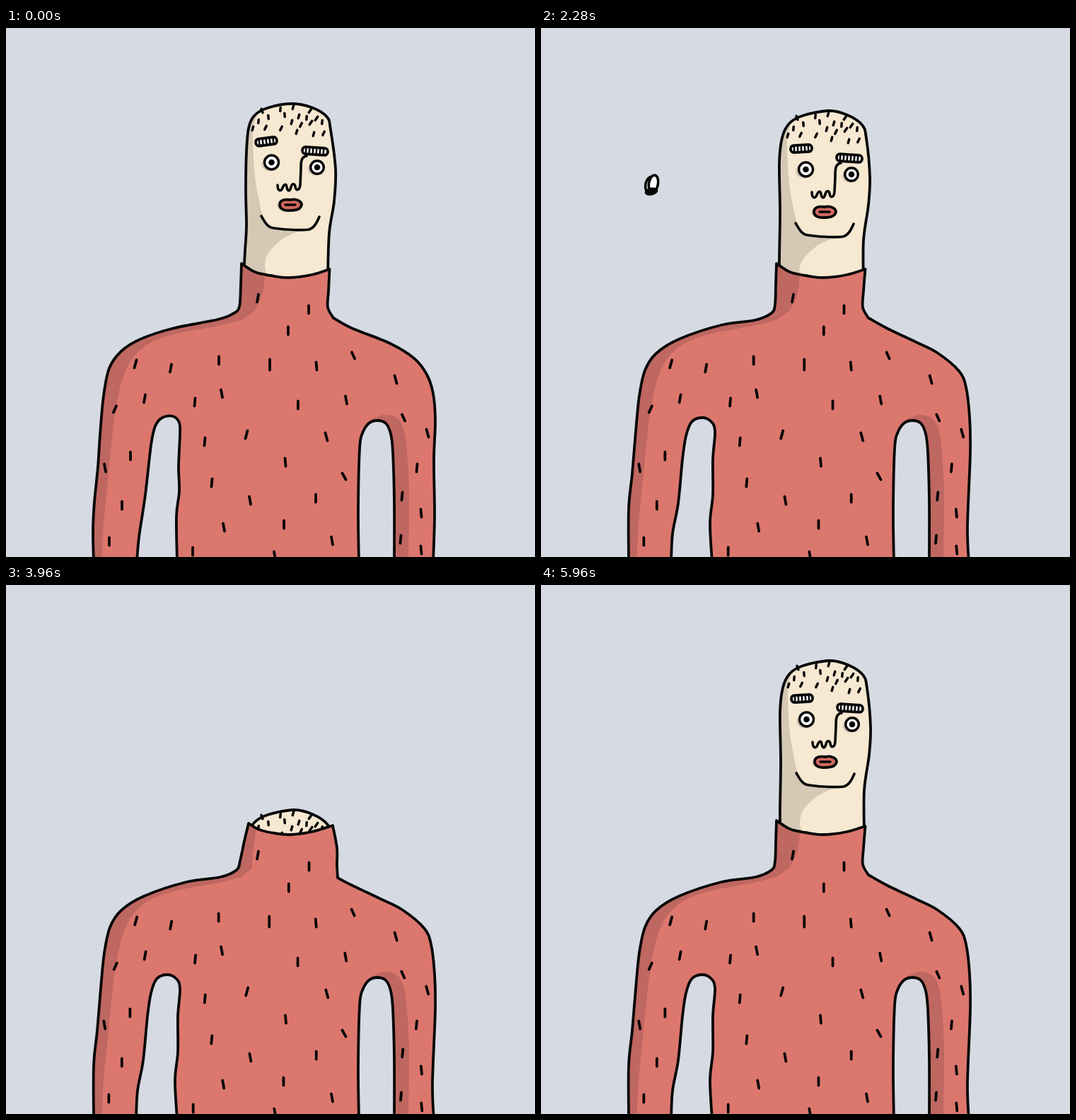
Recreate the animation shown at these times as an HTML page. Size 748 px wide and 748 px high, loop 6000 ms.

```html
<!DOCTYPE html>
<html lang="en">
<head>
<meta charset="utf-8">
<title>Turtleneck</title>
<style>
  html, body { margin: 0; width: 100%; height: 100%; overflow: hidden; background: #d6dae3; }
  svg { display: block; width: 100vw; height: 100vh; }
  .ink { stroke: #060606; stroke-width: 3.8; stroke-linecap: round; stroke-linejoin: round; fill: none; }
  .shade { fill: #1c1018; opacity: .15; }
</style>
</head>
<body>
<svg id="stage" viewBox="0 0 748 748">
  <defs>
    <clipPath id="inBody"><path id="bodyClip"/></clipPath>
    <clipPath id="inHead"><path id="headClip"/></clipPath>
    <clipPath id="aboveCollar"><rect width="748" height="352"/></clipPath>
  </defs>
  <g clip-path="url(#aboveCollar)"><g id="head"></g></g>
  <g id="body"></g>
  <g id="fly"></g>
</svg>
<script>
const el = id => document.getElementById(id);
const FPS = 6, DRAWINGS = 36, TICK = 40, LOOP = 6000;

const points = s => s.trim().split(/\s+/).map(p => p.split(',').map(Number));

// Catmull-Rom curve through points, without the initial move
function curve(pts) {
  let d = `L${pts[0]}`;
  for (let i = 0; i < pts.length - 1; i++) {
    const a = pts[i - 1] || pts[i], b = pts[i], c = pts[i + 1], e = pts[i + 2] || c;
    const c1 = b.map((v, j) => (v + (c[j] - a[j]) / 6).toFixed(1));
    const c2 = c.map((v, j) => (v - (e[j] - b[j]) / 6).toFixed(1));
    d += `C${c1} ${c2} ${c}`;
  }
  return d;
}
const join = (...parts) => 'M' + parts.map(curve).join('').slice(1);

const HEAD = [
  '336,350 338,315 340,280 339,230 340,175 343,142 351,124 370,113 404,107 434,113 454,126 459,144 466,200 464,245 457,290 455,352',
  '338,350 338,315 339,250 338,180 342,145 352,125 371,114 408,107 434,113 455,127 461,146 466,200 464,240 457,290 457,352'
].map(points);
const HEAD_SHADE = join(points('320,120 353,120 349,145 351,200 357,240 364,268 376,282'),
  points('414,287 390,299 371,318 366,335 365,355 320,355')) + 'Z';

const LEFT = [
  '330,394 321,404 300,412 235,425 190,440 163,457 146,481 138,520 133,575 130,620 125,670 123,710 124,756',
  '331,390 326,403 303,413 255,420 195,440 163,460 147,484 139,520 134,570 129,630 124,680 124,756'
].map(points);
const GAP_LEFT = [
  '185,756 188,720 197,660 205,590 211,563 221,551 236,549 245,558 246,574 244,620 245,655 241,690 242,756',
  '184,756 186,715 194,672 200,610 205,577 213,557 227,551 240,556 246,570 243,610 243,660 239,700 242,756'
].map(points);
const GAP_RIGHT = points('499,756 498,680 500,595 504,573 513,559 525,555 537,559 544,574 547,600 549,670 549,756');
const RIGHT = [
  '604,756 606,690 605,610 607,555 604,517 595,490 577,467 543,446 488,424',
  '605,756 603,705 607,600 606,550 601,508 591,485 560,459 530,444 488,424'
].map(points);

const HAIR = points(`362,117 388,115 406,112 430,117 371,126 357,132 349,142 367,141 394,123 414,125
  404,133 389,142 425,127 411,147 417,137 431,134 447,133 435,150 449,149 439,128`);

// x, y and lean of every dash on the sweater
const DASHES = points(`356,382,2 428,398,0 399,428,0 183,475,3 233,481,2 301,470,0 373,476,0 439,478,-1
  491,463,-4 551,497,-3 196,524,2 154,539,4 267,529,1 305,517,-2 413,533,0 481,526,-2 562,551,-4 596,573,-3
  281,585,1 340,575,3 453,578,-3 395,614,-1 478,634,-5 581,622,1 140,622,-2 176,605,0 291,643,1 345,668,-2
  438,665,0 560,662,1 587,686,-1 164,675,0 146,726,0 308,706,-2 393,702,0 461,725,-2 558,723,1 587,738,-1
  264,740,0 380,746,-2`);

const FLIGHT = points('738,205 680,245 508,289 440,312 370,318 300,300 228,262 156,221 12,190');
const FLIGHT_START = 6, DUCK_START = 12, RISE_START = 26, LOW = 211;
const DUCK = [0, 10, 28, 52, 80, 108, 136, 162, 189, 204, LOW];
const RISE = [LOW, 203, 178, 145, 109, 74, 45, 25, 10, 0];

function headDrop(k) {
  if (k < DUCK_START) return 0;
  if (k >= RISE_START) return RISE[k - RISE_START];
  return DUCK[Math.min(k - DUCK_START, DUCK.length - 1)];
}

const path = (d, attrs = 'class="ink"') => `<path d="${d}" ${attrs}/>`;
const oval = (x, y, rx, ry, attrs) => `<ellipse cx="${x}" cy="${y}" rx="${rx}" ry="${ry}" ${attrs}/>`;
const inked = (fill, width = 3.8) => `class="ink" style="fill:${fill};stroke-width:${width}"`;

function brow(x, y, w, tilt) {
  let bars = '';
  for (let i = -w / 2 + 5; i < w / 2 - 2; i += 5) bars += `M${i} -4L${i} 4`;
  return `<g transform="translate(${x} ${y}) rotate(${tilt})">
    <rect x="${-w / 2}" y="-5" width="${w}" height="10" rx="4.5" ${inked('#fff')}/>
    ${path(bars, inked('none', 2.6))}</g>`;
}

function eye(x, y, r, gaze) {
  return oval(x - 3, y + 2.5, r + 1, r, 'class="shade"') + oval(x, y, r, r, inked('#fff', 3.4)) +
    oval(x + gaze[0], y + gaze[1], 4.3, 4.3, 'fill="#060606"');
}

function drawHead(odd, drop, gaze) {
  const outline = join(HEAD[odd]);
  el('headClip').setAttribute('d', outline);
  const hair = HAIR.map(([x, y], i) => {
    const lean = i === 0 ? -2 : i % 4 - 0.5 + (x > 410 ? 1 : 0);
    return `M${x + odd + lean / 2} ${y - 2.6}L${x + odd - lean / 2} ${y + 2.6}`;
  }).join('');
  const nose = 'M425 181C417 182 417 190 417 200L416 222C415 230 410 231 409 224C408 219 404 220 403 225' +
    'C401 232 398 231 397 225C396 219 393 221 391 226C389 232 384 231 384 222';
  const lips = 'M387 250C387 243 394 242 402 243C411 241 418 245 418 250C417 256 410 258 402 258C394 259 387 256 387 250Z';
  const jaw = 'M361 266C366 274 369 282 379 283C400 286 420 286 428 285C436 283 440 274 443 267';
  el('head').setAttribute('transform', `translate(${-odd * Math.min(drop, 10) / 10} ${drop})`);
  el('head').innerHTML = path(outline, 'fill="#f6e8d1"') +
    (drop < 150 ? `<g clip-path="url(#inHead)">${path(HEAD_SHADE, 'class="shade"')}</g>` : '') +
    path(outline) + path(hair, inked('none', 3.5)) +
    brow(368 + odd, 160.5, 30, odd ? -3 : -7) + brow(437, 174, 36, 4) +
    eye(375.5, 190, 10, gaze) + eye(440, 197, 9.3, gaze) +
    path(nose, inked('none', 3.6)) +
    oval(398, 251, 15, 9, 'class="shade"') + path(lips, inked('#d0695f')) + path('M395 250L409 250', inked('none', 3.4)) +
    path(jaw, inked('none', 3.6));
}

function drawBody(k, odd, drop) {
  const wide = Math.max(0, Math.min(1, (drop - 60) / 110));
  const pinch = k >= 22 && k <= 28 ? 1 : 0;
  const side = odd || wide > 0.5 ? 1 : 0;
  const rightTop = 457.5 + side + 6.5 * wide - 3 * pinch;
  const topY = 341 - 5 * wide + 4 * pinch;
  const leftTop = 333 + 10 * pinch;
  const neckX = 455 + 13 * wide;

  const rim = [[rightTop, topY], [432, 349], [400, 353], [374, 350], [352 + 4 * pinch, 345], [leftTop, 333 + 4 * pinch]];
  const left = [[leftTop, 333 + 4 * pinch], [332 + 5 * pinch, 362], ...LEFT[side]];
  const right = [...RIGHT[side], [463 + 6 * wide, 410 + 4 * wide]];
  const neck = [[463 + 6 * wide, 410 + 4 * wide], [neckX, 395], [neckX + 1 - wide, 372], [rightTop, topY]];
  const outline = join(rim, left, GAP_LEFT[odd], GAP_RIGHT, right, neck) + 'Z';
  el('bodyClip').setAttribute('d', outline);

  const edge = 366 - 19 * wide + 6 * pinch;
  const leftShade = join([[300, 320], [edge, 320], [edge, 350], [edge - 4, 378], [edge - 15 + 10 * wide, 400]],
    points('333,413 300,421 230,435 190,455 168,487 155,540 146,620 138,700 133,756 110,756 110,480')) + 'Z';
  const rightShade = join(points('518,553 535,547 552,551 562,567 567,600 570,660 569,756'),
    points('540,756 540,580 520,560')) + 'Z';

  const dashes = DASHES.map(([x, y, lean], i) => {
    const dx = odd * Math.sin(i * 7) * 0.8, half = i === 6 ? 7.5 : Math.abs(lean) > 3 ? 4.5 : 5.5;
    return `M${x + lean / 2 + dx} ${y - half}L${x - lean / 2 + dx} ${y + half}`;
  }).join('');

  el('body').innerHTML = path(outline, 'fill="#dc776e"') +
    `<g clip-path="url(#inBody)">${path(leftShade, 'class="shade"')}${path(rightShade, 'class="shade"')}</g>` +
    path(outline) + path(dashes);
}

function drawFly(pos, odd) {
  if (!pos) { el('fly').innerHTML = ''; return; }
  const wing = (x, y, rx, ry, tilt) => oval(x, y, rx, ry, `transform="rotate(${tilt} ${x} ${y})" ${inked('#fff', 3.6)}`);
  el('fly').setAttribute('transform', `translate(${pos})`);
  el('fly').innerHTML = odd
    ? wing(-2, 0, 6, 11, 14) + wing(3, -1, 6.5, 12, 10) + oval(-2, 10, 9.5, 5.5, 'fill="#060606" transform="rotate(-12)"')
    : wing(-6, -5, 5, 10, -8) + wing(6, -2, 5.2, 10.5, 14) + oval(-4, 9, 8.5, 7, 'fill="#060606"');
}

function render(ms) {
  const tick = Math.floor((ms % LOOP) / TICK);
  const k = Math.floor(tick * TICK * FPS / 1000) % DRAWINGS;
  const odd = k % 2, drop = headDrop(k);
  const pos = FLIGHT[k - FLIGHT_START];
  let gaze = [0, 0];
  if (pos && k <= DUCK_START) {
    const dx = pos[0] - 408, dy = pos[1] - 193, len = Math.hypot(dx, dy);
    gaze = [dx / len * 4, dy / len * 4];
  }
  drawHead(odd, drop, gaze);
  drawBody(k, odd, drop);
  drawFly(pos, odd);
}

let start;
function loop(now) {
  start ??= now;
  render(now - start);
  requestAnimationFrame(loop);
}
render(0);
requestAnimationFrame(loop);
</script>
</body>
</html>
```
